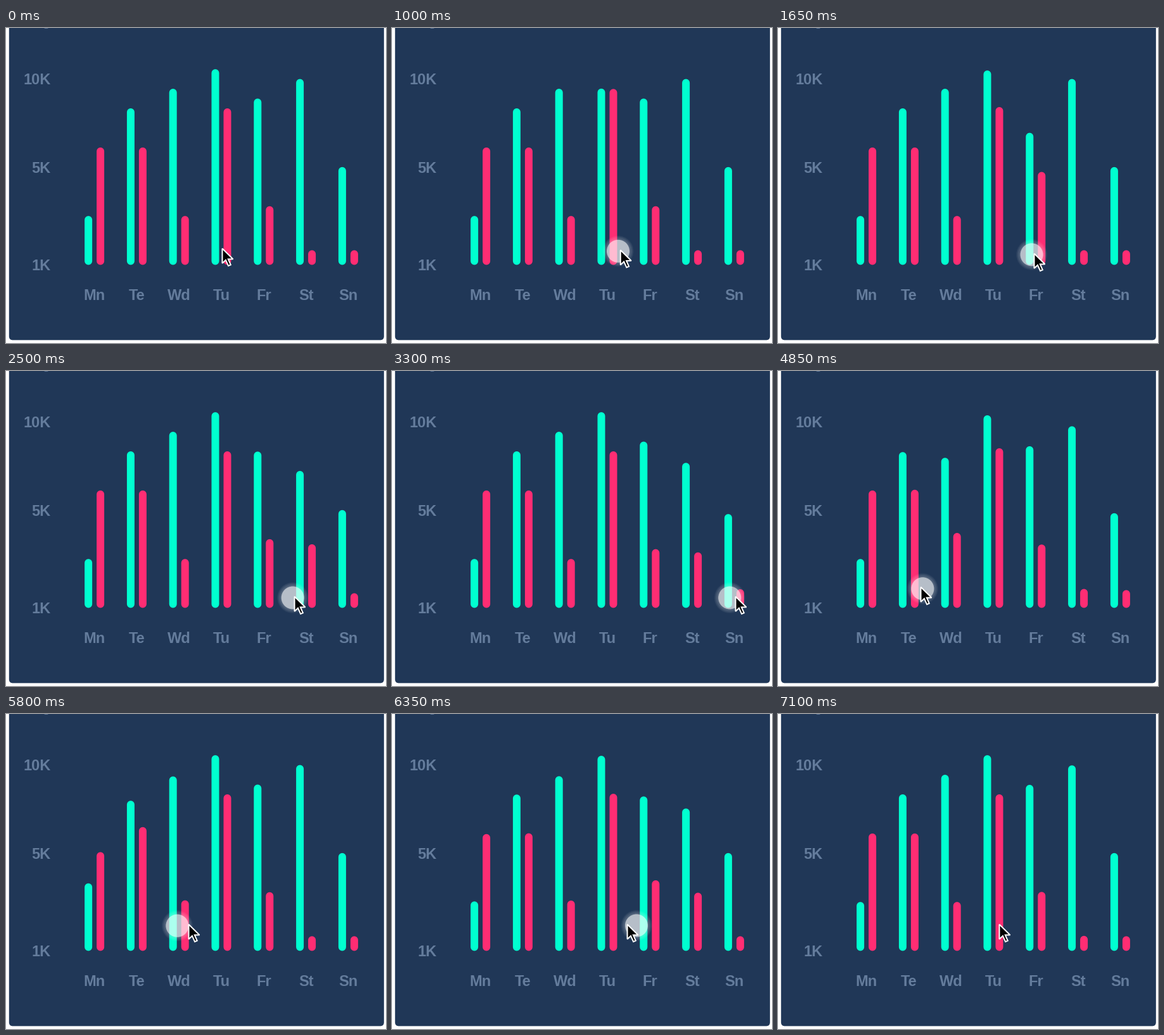
Animation of 600 by 498 pixels, one loop 7150 ms. Source, as a matplotlib script:

```python
import numpy as np
import matplotlib.pyplot as plt
from matplotlib.animation import FuncAnimation
from matplotlib.patches import Circle, FancyBboxPatch, Polygon

W, H, DPI = 600, 498, 100
STEP, FRAMES = 50, 143
PX = 72 / DPI

NAVY, SLATE = "#203757", "#647c9c"
GREEN, PINK = "#00ffd0", "#ff2d73"

# daily values in thousands
DAYS = ["Mn", "Te", "Wd", "Tu", "Fr", "St", "Sn"]
FIRST_SET = np.array([2.5, 6, 8, 6, 9, 2.5, 10, 8, 8.5, 3, 9.5, 0.75, 5, 0.75])
VALUES = FIRST_SET.reshape(-1, 2)
MEANS = VALUES.mean(axis=1, keepdims=True)

UNIT, BASE = 30.94, 374.5      # px per thousand, foot of the bars
LEFT, PITCH, PAIR, BAR = 130.1, 66.8, 19, 12
CENTERS = LEFT + PAIR / 2 + PITCH * np.arange(len(DAYS))

TAU, DELAY, REACH = 158, 60, 30   # bar easing and reaction in ms, hover half-width
LAG = 25                          # touch dot trails the pointer, ms
PRESS, RELEASE = 250, 6400

# pointer stops and turns along x, and its slow drift in y
X_KEYS = np.array([
    (700, 340), (1158, 370), (1433, 377), (1650, 403), (2900, 480),
    (3122, 503.5), (3220, 510), (3300, 541), (3420, 548), (4100, 547),
    (4300, 531), (4385, 509), (4475, 440), (4650, 306), (4770, 240),
    (4850, 224), (5250, 153), (5450, 137), (5600, 143), (5650, 170),
    (5725, 236), (5800, 287), (6120, 508), (6420, 348),
], float)
Y_KEYS = [(700, 347), (1650, 355), (4300, 355), (4850, 340), (5800, 331)]

ARROW = np.array([(1, 1.6), (1, 25), (6.4, 19.8), (10.6, 29),
                  (14.3, 27.4), (10.3, 18.4), (18, 18.4)]) + (0.5, 0)


def monotone(keys):
    """Smooth curve through the keys that never overshoots them."""
    t, v = keys.T
    d = np.diff(v) / np.diff(t)
    a, b = d[:-1], d[1:]
    m = np.zeros_like(v)
    same = a * b > 0
    m[1:-1][same] = 2 * (a * b)[same] / (a + b)[same]

    def at(x):
        x = np.clip(x, t[0], t[-1])
        i = min(np.searchsorted(t, x, "right") - 1, len(t) - 2)
        h = t[i + 1] - t[i]
        s = (x - t[i]) / h
        return (v[i] + (v[i + 1] - v[i]) * s * s * (3 - 2 * s)
                + h * s * (1 - s) * ((1 - s) * m[i] - s * m[i + 1]))
    return at


tip_x = monotone(X_KEYS)


def tip(t):
    return np.array([tip_x(t), np.interp(t, *zip(*Y_KEYS))])


def simulate(dt=2):
    """Per frame, how far each pair has eased to its mean under the pointer."""
    level, out = np.zeros(len(DAYS)), []
    for t in range(0, FRAMES * STEP, dt):
        if t % STEP == 0:
            out.append(level.copy())
        hover = np.abs(tip_x(t - DELAY) - CENTERS) < REACH
        goal = hover & (PRESS < t < RELEASE)
        level += (goal - level) * (1 - np.exp(-dt / TAU))
    return np.array(out)


LEVELS = simulate()


def smooth(s):
    s = np.clip(s, 0, 1)
    return s * s * (3 - 2 * s)


fig = plt.figure(figsize=(W / DPI, H / DPI), dpi=DPI, facecolor="white")
ax = fig.add_axes([0, 0, 1, 1])
ax.set(xlim=(0, W), ylim=(H, 0))
ax.axis("off")

ax.add_patch(FancyBboxPatch((4.8, -30), 592, 523.4, fc=NAVY, ec="none", lw=0,
                            boxstyle="round,pad=0,rounding_size=6"))


def label(x, y, s, align):
    ax.text(x, y, s, ha=align, va="baseline", color=SLATE,
            family="Liberation Sans", weight="bold", size=23.6 * PX)


for y, s in ((89, "10K"), (228.5, "5K"), (383, "1K")):
    label(70.5, y, s, "right")
for x, day in zip(CENTERS, DAYS):
    label(x, 430, day, "center")

# descender of the heading cut off by the top edge
ax.plot([59.5, 62, 65, 67.5], [-1.6, -0.4, -0.4, -1.6], color=SLATE, lw=2.6 * PX)


def bar(x, color):
    return ax.plot([x, x], [BASE, BASE], color=color, lw=BAR * PX,
                   solid_capstyle="round", snap=False)[0]


bars = [(bar(x - PAIR / 2, GREEN), bar(x + PAIR / 2, PINK)) for x in CENTERS]

dot = [Circle((0, 0), 18, fc="white", lw=0, zorder=4)]
dot += [Circle((0, 0), r, fc="white", lw=0, zorder=3) for r in np.arange(18.5, 25)]
for c in dot:
    ax.add_patch(c)

arrow = ax.add_patch(Polygon(ARROW, fc="black", ec="white", lw=2 * PX,
                             joinstyle="miter", zorder=5))


def draw(frame):
    t = frame * STEP
    level = LEVELS[frame][:, None]
    tops = BASE - UNIT * (VALUES + (MEANS - VALUES) * level)
    for pair, pair_tops in zip(bars, tops):
        for line, top in zip(pair, pair_tops):
            line.set_ydata([top + BAR / 2, BASE - BAR / 2])
    fade = smooth((t - PRESS) / 150) * (1 - smooth((t - RELEASE) / 200))
    for k, c in enumerate(dot):
        c.center = tip(t - LAG) + (0, 3.5)
        c.set_alpha(fade * (0.045 if k else 0.57))
    arrow.set_xy(ARROW + tip(t))
    return [arrow, *dot, *(line for pair in bars for line in pair)]


anim = FuncAnimation(fig, draw, frames=FRAMES, interval=STEP,
                     repeat=True, repeat_delay=0, blit=False)
plt.show()
```
